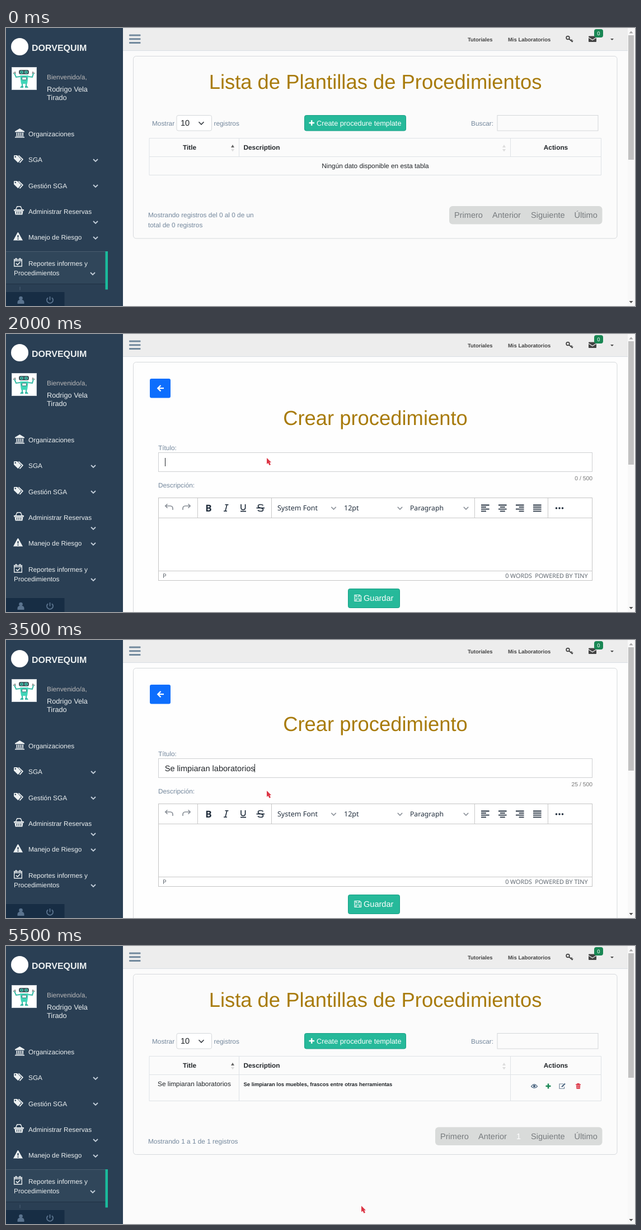
Write an HTML page that moves like this. It is 1124 px wide and 498 px high and loops after 6000 ms.

```html
<!DOCTYPE html>
<html lang="es">
<head>
<meta charset="utf-8">
<style>
  html, body { margin: 0; width: 100%; height: 100%; overflow: hidden; background: #fbfbfb; }
  svg { display: block; font-family: "Liberation Sans", Arial, sans-serif; text-rendering: geometricPrecision; }
  .ui { font-family: "Noto Sans", sans-serif; }
  .b { font-weight: bold; }
  .mid { text-anchor: middle; }
  .end { text-anchor: end; }
</style>
</head>
<body>
<svg id="stage" width="1124" height="498" viewBox="0 0 1124 498"></svg>
<script>
const NAVY = '#2a3f54', SLATE = '#73879c', INK = '#212529', GREEN = '#26b99a', DARK_GREEN = '#169f85';
const GOLD = '#a87b0b', LIGHT = '#ecf0f1', TOOL = '#222f3e', BORDER = '#dee2e6';
const BODY = 11.83, BUTTON = 12.74, LARGE = 14.56, HEADING = 36.4;

const text = (x, y, s, fill = INK, size = BODY, cls = '') =>
  `<text x="${x}" y="${y}" fill="${fill}" font-size="${size}" class="${cls}">${s}</text>`;
const box = (x, y, w, h, fill, stroke = 'none', r = 0) =>
  `<rect x="${x}" y="${y}" width="${w}" height="${h}" rx="${r}" fill="${fill}" stroke="${stroke}"/>`;
const shape = (d, fill) => `<path d="${d}" fill="${fill}"/>`;
const line = (d, stroke, width = 1) => `<path d="${d}" fill="none" stroke="${stroke}" stroke-width="${width}"/>`;
const dot = (x, y, r, fill) => `<circle cx="${x}" cy="${y}" r="${r}" fill="${fill}"/>`;
const chevron = (x, y, stroke, size = 4, width = 1.8) =>
  line(`M${x - size} ${y - size / 2}l${size} ${size} ${size} ${-size}`, stroke, width);
const at = (x, y, content) => `<g transform="translate(${x} ${y})">${content}</g>`;

function avatar() {
  const teal = '#3fd6b8';
  return box(10.5, 70.5, 44, 40, '#fff', '#cfd6dc') +
    line('M25 87L18 88 15 81M40 87L47 88 49 81M29 100V106M36 100V106', '#35b9a4', 2) +
    line('M13 82l2-3M17 82l-1-4M47 82l1-4M51 82l-2-3', '#555', 1) +
    box(23, 75, 18, 8, '#46585f', 'none', 3) + dot(28, 79, 2.6, teal) + dot(36, 79, 2.6, teal) +
    dot(28, 79, 1, '#223') + dot(36, 79, 1, '#223') +
    shape('M25 85H40L38 100H27Z', teal) + box(28.5, 88, 8, 5, '#e8f7f3', '#3a6f70', 1) +
    shape('M25 107h6v-3h-4zM40 107h-6v-3h4z', '#35b9a4');
}

const bank = shape('M0 5L8.5 0 17 5v1.5H0zM2.5 7.5h2v5h-2zM6 7.5h2v5H6zM9.5 7.5h2v5h-2zM13 7.5h2v5h-2zM1.5 13h14v1.3h-14zM0 15h17v1.5H0z', LIGHT);
const tags = shape('M0 1.2Q0 0 1.2 0H6L13 7 7.5 13.3 0 6z', LIGHT) + dot(2.8, 2.8, 1.2, NAVY) + line('M8.5.3l7.3 7-5.4 6', LIGHT, 1.8);
const basket = shape('M0 6H18V8.5H0zM1.5 9h15l-1.2 6.5H2.7z', LIGHT) +
  line('M3.5 6L6 .8h6L14.5 6', LIGHT, 1.5) + line('M5.5 10v4M9 10v4M12.5 10v4', NAVY, 1.2);
const warning = shape('M8.3 0Q9 0 9.4.8L17 14.5H0L7.4.8Q7.7 0 8.3 0z', LIGHT) + line('M8.5 5v4.6M8.5 11v1.8', NAVY, 2);
const calendar = line('M.7 2.5h13.6v12.3H.7zM.7 5h13.6', LIGHT, 1.4) +
  line('M4 0v3.5M11 0v3.5', LIGHT, 2) + line('M4 9.6l2.6 2.5 4.6-4.8', LIGHT, 1.6);

function sidebar(active) {
  const arrowX = active ? 160 : 156;
  const item = (y, label, icon, ix, iy) => at(ix, iy, icon) + text(40, y, label, LIGHT);
  return box(0, 0, 209, 498, NAVY) +
    dot(24.5, 33.5, 15.5, '#fff') + text(46, 41, 'DORVEQUIM', LIGHT, 16, 'b') + avatar() +
    text(73, 92, 'Bienvenido/a,', '#bab8b8') +
    text(73, 113.5, 'Rodrigo Vela', LIGHT, BUTTON) + text(73, 129, 'Tirado', LIGHT, BUTTON) +
    (active
      ? box(0, 400, 178, 59, '#30465a') + line('M0 400.5H178', '#4a5e70') + line('M0 458.5H178', '#1f3143') +
        box(177.5, 400, 4.5, 68.5, '#1abb9c') + line('M25 463.5v6', '#4c6276')
      : '') +
    item(193.5, 'Organizaciones', bank, 16, 180) +
    item(240, 'SGA', tags, 14, 228) +
    item(286.5, 'Gestión SGA', tags, 14, 274) +
    item(332.5, 'Administrar Reservas', basket, 14, 319) +
    item(379, 'Manejo de Riesgo', warning, 13, 366) +
    item(425.5, 'Reportes informes y', calendar, 14, 412) +
    text(14, 443, 'Procedimientos', LIGHT) +
    [237, 283, 348, 376].map(y => chevron(arrowX, y, '#c4cfda')).join('') +
    chevron(active ? 155 : 156, 440, '#c4cfda') +
    box(0, 473, 104.5, 25, '#172d44') +
    dot(26.5, 484, 3.3, '#5a738e') + shape('M20.5 494v-2.5q0-4 3.5-4.5h5q3.500.5 3.500 4.500V494z', '#5a738e') +
    line('M75 483.200a5.500 5.500 0 1 0 7 0M78.500 481v6.500', '#5a738e', 1.8);
}

function topbar() {
  return box(209, 0, 902, 40, '#ededed') + line('M209 40.5H1111', '#d9dee4') +
    [11.5, 18.3, 25.1].map(y => box(220, y, 20.5, 3, '#71889c', 'none', 1)).join('') +
    text(825, 24.3, 'Tutoriales', '#444', 9.46, 'b') + text(897, 24.3, 'Mis Laboratorios', '#444', 9.46, 'b') +
    `<circle cx="1004" cy="17.500" r="2.800" fill="none" stroke="#444" stroke-width="1.800"/>` +
    line('M1006 19.500L1012.500 25M1009.500 22.500l2-2M1011.500 24.300l1.500-1.800', '#444', 1.7) +
    box(1041, 14.5, 14, 10.5, '#444', 'none', 1) + line('M1041 17l7 4.500 7-4.500', '#ededed', 1.2) +
    box(1051, 2, 16, 15, '#198754', 'none', 4) + text(1059, 13, '0', '#fff', 9.5, 'mid') +
    shape('M1080 19h6l-3 3z', '#444');
}

function scrollbar(bottom) {
  return box(1111, 0, 13, 498, '#f8f8f8') + box(1112, 13, 10, bottom - 13, '#c1c1c1') +
    shape('M1113.500 9.500h7l-3.500-4z', '#a3a3a3') + shape('M1113.500 489h7l-3.500 4z', '#505050');
}

function actionIcons() {
  return line('M938.500 251.500q5.500-7.500 11 0q-5.500 6-11 0z', '#4b6580', 1.2) + dot(944, 251, 2.2, '#4b6580') +
    line('M964.500 251h9M969 246.500v9', '#198754', 2.5) +
    line('M996 247h-7v8.500h8.500V252', SLATE, 1.2) + line('M993 252.500l6-6', '#4b6580', 2.2) +
    line('M1018 248.300h9M1021 247.500v-.8h3v.8', '#dc3545', 1.4) + shape('M1019 249.500h7.200l-.5 6.500h-6.200z', '#dc3545') +
    line('M1021.300 250.800v4M1023.900 250.800v4', '#fbfbfb', .7);
}

function pager(y, labels) {
  const left = labels[0][0] - 9;
  return box(left, y, 1065.5 - left, 32.5, '#d9dbda', 'none', 6) +
    labels.map(([x, s]) => text(x, y + 21, s, s === '1' ? '#fff' : '#777b7e', LARGE)).join('');
}

function listPage(hover, filled) {
  const rowEnd = filled ? 277.5 : 263.5;
  const sorter = (x, up) => shape(`M${x - 3} 214h6l-3-5z`, up) + shape(`M${x - 3} 217h6l-3 4.500z`, '#dcdcdc');
  return box(227.5, 50.5, 864.5, filled ? 323 : 326.5, '#fbfbfb', '#d6d9dc', 5) +
    text(660, 109, 'Lista de Plantillas de Procedimientos', GOLD, HEADING, 'mid') +
    text(261, 174.5, 'Mostrar', SLATE) + text(371.5, 174.5, 'registros', SLATE) +
    box(305, 156.5, 62.5, 27.5, '#fff', '#d4d7da', 3) + text(312, 175.3, '10', INK, LARGE) + chevron(349, 170.5, '#343a40', 4.5, 1.6) +
    box(533.5, 156.5, 181, 27.5, hover ? DARK_GREEN : GREEN, hover ? '#0e6f5c' : DARK_GREEN, 3) +
    line('M541.500 170h9.500M546.200 165.300v9.500', '#fff', 2.5) +
    text(555, 174.7, 'Create procedure template', '#fff', BUTTON) +
    text(831, 174.5, 'Buscar:', SLATE) + box(878, 156.5, 180, 27.5, '#fbfbfb', '#d4d7da') +
    line(`M256 197.500H1063.500V${rowEnd}H256ZM256 230.500H1063.500`, BORDER) +
    line(filled ? `M416.500 197.500V${rowEnd}M901.500 197.500V${rowEnd}` : 'M416.500 197.500V230.500M901.500 197.500V230.500', BORDER) +
    text(328, 218, 'Title', INK, BODY, 'b mid') + text(424.5, 218, 'Description', INK, BODY, 'b') +
    text(982.5, 218, 'Actions', INK, BODY, 'b mid') + sorter(405, '#666') + sorter(890, '#dcdcdc') +
    (filled
      ? text(271, 251, 'Se limpiaran laboratorios') +
        text(424.5, 250.7, 'Se limpiaran los muebles, frascos entre otras herramientas', INK, 9.46, 'b') + actionIcons() +
        text(254, 353.7, 'Mostrando 1 a 1 de 1 registros', SLATE) +
        pager(324.5, [[776, 'Primero'], [844, 'Anterior'], [912, '1'], [938, 'Siguiente'], [1015.5, 'Último']])
      : text(660, 251, 'Ningún dato disponible en esta tabla', INK, BODY, 'mid') +
        text(254, 339, 'Mostrando registros del 0 al 0 de un', SLATE) + text(254, 356.5, 'total de 0 registros', SLATE) +
        pager(319, [[801, 'Primero'], [869, 'Anterior'], [938, 'Siguiente'], [1015.5, 'Último']]));
}

function toolbar() {
  const undo = line('M4.500-7.500L.8-4l3.700 3.700M1-4h8.500q4.500.3 4.500 4.500v2.500', '#8b9199', 1.7);
  const align = (x, short) => line(`M0 .7h14.600M${short}M0 7.900h14.600M${short.replace('4.300', '11.500')}`.replace(/^/, ''), TOOL, 1.8);
  const rows = ['0 4.300h9', '2.800 4.300h9', '5.600 4.300h9', '0 4.300h14.600'];
  return at(284, 312, undo) + `<g transform="translate(330 312) scale(-1 1)">${undo}</g>` +
    text(362, 318, 'B', TOOL, 17, 'b mid ui') +
    line('M391.500 305.800h6M389 317.300h6M394.800 306l-2.800 11', TOOL, 1.6) +
    line('M420 305v6q0 3.800 3.800 3.800t3.800-3.800v-6M419 317.700h10', TOOL, 1.7) +
    line('M459.500 307.200q-1.200-1.700-4.700-1.700-4.300 0-4.300 2.900 0 2 4 3 5 1.200 5 3.300 0 2.800-4.500 2.800-3.600 0-5-2M447.500 311.700h14.500', TOOL, 1.7) +
    text(485, 316.2, 'System Font', TOOL, 12.5, 'ui') + text(604, 316.2, '12pt', TOOL, 12.5, 'ui') + text(722, 316.2, 'Paragraph', TOOL, 12.2, 'ui') +
    [585.5, 704, 822].map(x => chevron(x, 312, '#8b9199', 4.2, 1.5)).join('') +
    rows.map((row, i) => at(849 + i * 31, 305.8, align(0, row))).join('') +
    [983.5, 989, 994.5].map(x => dot(x, 312, 1.8, TOOL)).join('');
}

function formPage({ focused, titled, described, hover, caretX }) {
  return box(227.5, 50.5, 864.5, 470, '#fefefe', '#d6d9dc', 5) +
    box(257, 80, 37, 34.5, '#0d6efd', 'none', 3) + line('M282 97.200h-10.500M276.500 92l-5.200 5.200 5.200 5.200', '#fff', 2.3) +
    text(660, 163, 'Crear procedimiento', GOLD, HEADING, 'mid') +
    text(272, 208, 'Título:', SLATE) + box(272.5, 212.5, 775, 34, '#fff', '#ced0d2') +
    (titled ? text(283.7, 234.5, 'Se limpiaran laboratorios', INK, LARGE) : '') +
    (caretX ? line(`M${caretX} 222v15`, INK) : '') +
    (focused ? text(1048, 262, `${titled ? 25 : 0} / 500`, '#777', 10.4, 'end') : '') +
    text(272, 274.5, 'Descripción:', SLATE) +
    box(272.5, 293.5, 775, 148, '#fff', '#c4c4c4') +
    line('M272 329.500H1048M272 424.500H1048M342.500 294V329M474.500 294V329M837.500 294V329M968.500 294V329', '#c8c8c8') + toolbar() +
    (described ? text(288, 359.7, 'Se limpiaran los muebles, frascos entre otras herramientas', '#000', 13.76, 'b ui') : '') +
    text(280, 437, 'P', '#606870', 10.8, 'ui') +
    text(940, 437, `${described ? 8 : 0} WORDS`, '#606870', 10.8, 'ui end') + text(1039.5, 437, 'POWERED BY TINY', '#606870', 10.8, 'ui end') +
    box(611.5, 456.5, 92, 34, hover ? DARK_GREEN : GREEN, hover ? '#0e6f5c' : DARK_GREEN, 3) +
    line('M623 467.500h9l2.500 2.500v8.500H623zM625.500 467.500v3.500h5.500v-3.500M625.500 478.500v-4h6.500v4', '#fff', 1.2) +
    text(639, 478, 'Guardar', '#fff', LARGE);
}

// Pointer stops: time, x, y
const stops = [[500, 577.5, 163], [2000, 466, 222], [3500, 466, 270], [5000, 635, 465.5]];

function pointer(t) {
  const stop = stops.filter(([start]) => t >= start).pop();
  return stop ? at(stop[1], stop[2], shape('M0 0V11L2.500 9 4.600 13.200 7 12 5 8H8z', '#dc3545')) : '';
}

function caretAt(t) {
  if (t >= 2000 && t < 2500) return 284.5;
  return t >= 3000 && t < 4000 || t >= 4500 ? 444.5 : 0;
}

function scene(t) {
  const saved = t >= 5500, onList = t < 1000 || saved, focused = t >= 2000;
  const page = onList
    ? listPage(t >= 500 && !saved, saved)
    : formPage({ focused, titled: t >= 2500, described: t >= 4000, hover: t >= 5000, caretX: caretAt(t) });
  return box(209, 0, 915, 498, onList ? '#fbfbfb' : '#fdfdfd') + page + sidebar(onList) + topbar() +
    scrollbar(!onList && focused ? 234 : 236) + pointer(t);
}

const stage = document.getElementById('stage');
const began = performance.now();
let shown = -1;
function tick() {
  const t = Math.floor((performance.now() - began) % 6000 / 500) * 500;
  if (t !== shown) stage.innerHTML = scene(shown = t);
  requestAnimationFrame(tick);
}
tick();
</script>
</body>
</html>
```
